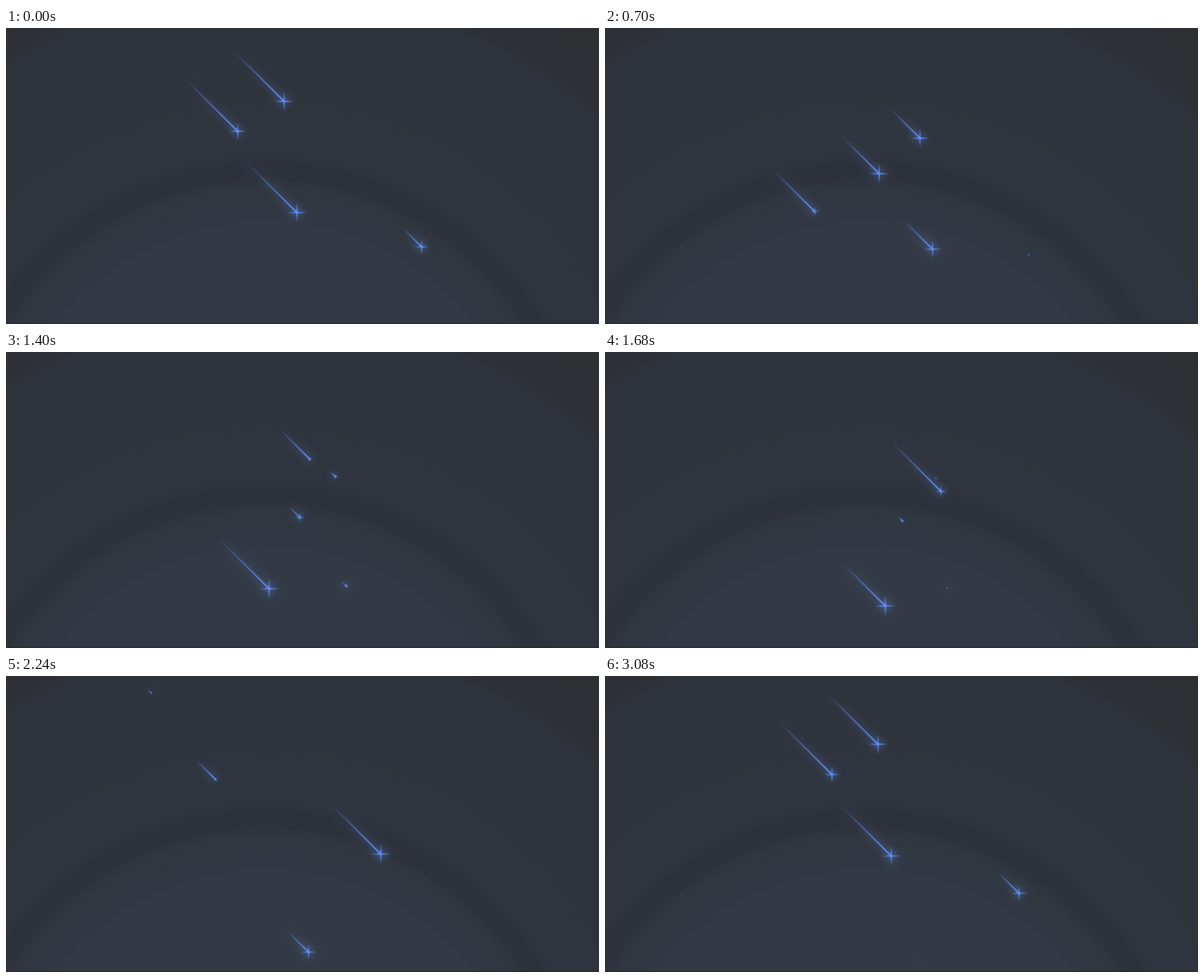
These frames come from a looping animation (800x400 px, 3.15 s). An HTML page:

```html
<!DOCTYPE html>
<html lang="en">
<head>
<meta charset="utf-8">
<title>Shooting stars</title>
<style>
  html, body { margin: 0; width: 100%; height: 100%; overflow: hidden; }
  #sky {
    position: relative; width: 800px; height: 400px; overflow: hidden;
    background: radial-gradient(circle at 350px 615px,
      #333a45 345px, #313843 362px, #30363f 402px, #2e323c 410px, #2e323c 434px,
      #2f343e 444px, #2f343e 503px, #2f333c 515px, #2f333b 662px, #2d3035 674px, #2d2f33 760px);
  }
  #sky::after {
    content: ""; position: absolute; left: 0; bottom: 0; width: 100%; height: 2px;
    background: rgba(38, 40, 56, .6);
  }
  .star {
    position: absolute; height: 2px; border-radius: 999px; transform-origin: 0 50%;
    background: linear-gradient(-45deg, rgb(95, 145, 255), rgba(0, 0, 255, 0));
    filter: drop-shadow(0 0 6px rgb(105, 155, 255));
  }
  .ray {
    position: absolute; top: 0; right: 0; height: 2px; border-radius: 100%;
    background: linear-gradient(-45deg, rgba(0, 0, 255, 0), rgb(95, 145, 255), rgba(0, 0, 255, 0));
  }
</style>
</head>
<body>
<div id="sky"></div>
<script>
  const LOOP = 3150, STEP = 70;
  const TRAVEL = 300, TAIL = 100, SHINE = 30;

  // x, y: launch point; delay: fraction of the loop
  const stars = [
    { x: 210.4, y: 174.9, delay: 0.02 },
    { x: 359.6, y: 95.1, delay: 0.285 },
    { x: 234.9, y: -41.1, delay: 0.594 },
    { x: 190.6, y: 18.1, delay: 0.66 },
    { x: 249.5, y: 107, delay: 0.584 }
  ];

  // cubic-bezier(.42, 0, .58, 1), solved by bisection
  function ease(x) {
    let lo = 0, hi = 1, u = 0.5;
    for (let i = 0; i < 24; i++) {
      u = (lo + hi) / 2;
      const bx = 1.26 * u * (1 - u) ** 2 + 1.74 * u * u * (1 - u) + u ** 3;
      if (bx < x) lo = u; else hi = u;
    }
    return u * u * (3 - 2 * u);
  }

  // Rises from 0 to 1 at the peak, then falls back to 0
  const pulse = (p, peak) =>
    p < peak ? ease(p / peak) : 1 - ease((p - peak) / (1 - peak));

  function addDiv(parent, className) {
    const div = document.createElement("div");
    div.className = className;
    return parent.appendChild(div);
  }

  const sky = document.getElementById("sky");
  for (const star of stars) {
    star.body = addDiv(sky, "star");
    star.body.style.left = star.x + "px";
    star.body.style.top = star.y - 1 + "px";
    star.rays = [45, -45].map(angle => {
      const ray = addDiv(star.body, "ray");
      ray.style.transform = `translateX(50%) rotate(${angle}deg)`;
      return ray;
    });
  }

  function draw(time) {
    for (const { delay, body, rays } of stars) {
      const p = (time / LOOP - delay + 1) % 1;
      body.style.width = TAIL * pulse(p, 0.3) + "px";
      body.style.transform = `rotate(45deg) translateX(${TRAVEL * ease(p)}px)`;
      for (const ray of rays) ray.style.width = SHINE * pulse(p, 0.5) + "px";
    }
  }

  const start = performance.now();
  function tick() {
    const elapsed = performance.now() - start + 1;
    draw(Math.floor(elapsed / STEP) * STEP % LOOP);
    requestAnimationFrame(tick);
  }
  tick();
</script>
</body>
</html>
```
